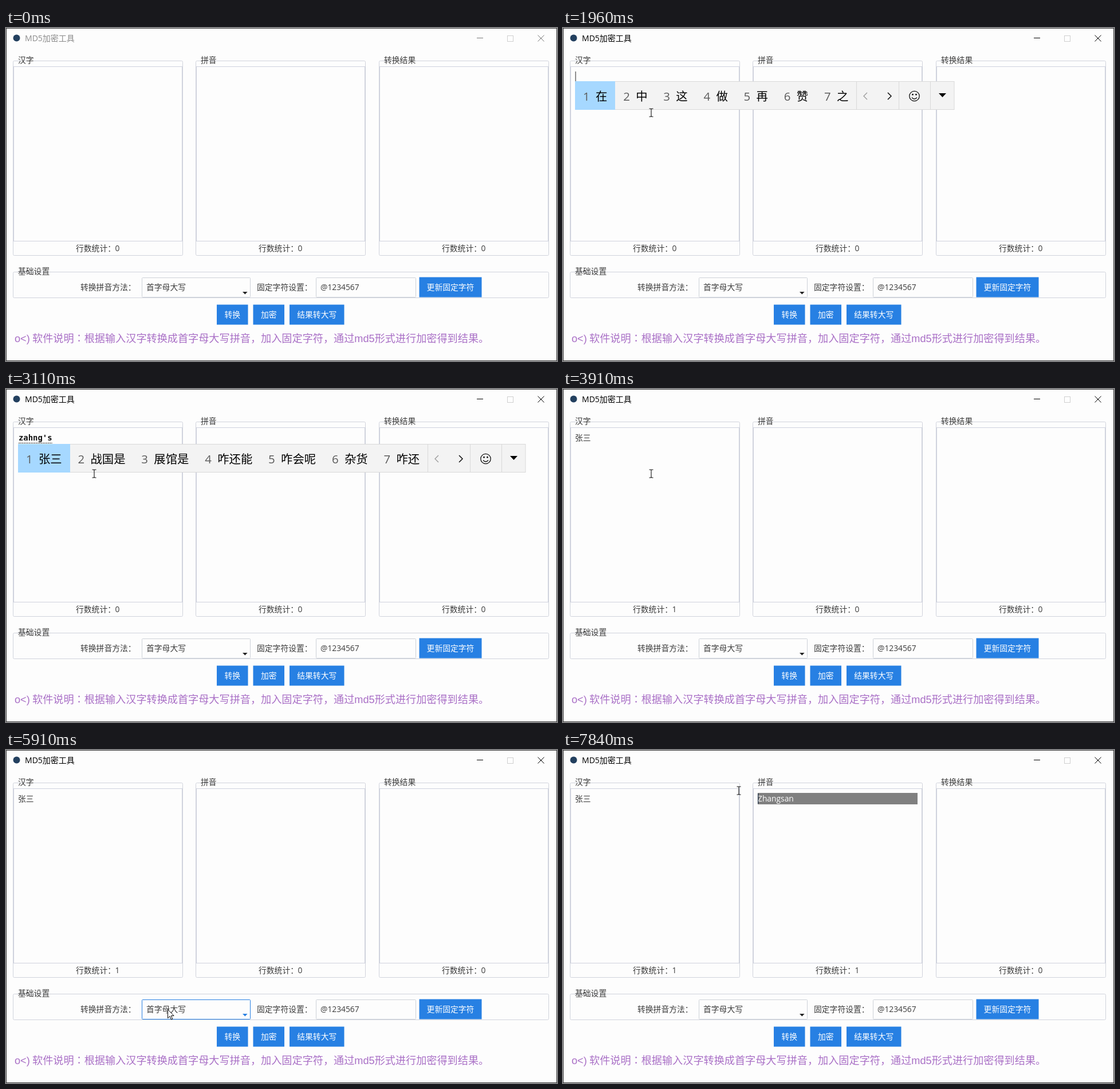
Recreate the animation shown at these times as an HTML page. Size 962x582 px, loop 7.99 s.

```html
<!DOCTYPE html>
<html lang="zh-CN">
<head>
<meta charset="utf-8">
<title>MD5加密工具</title>
<style>
html, body { margin: 0; width: 100%; height: 100%; overflow: hidden; background: #fdfdfd; }
svg { display: block; width: 962px; height: 582px; }
text { font-family: "Open Sans", "Noto Sans CJK SC", sans-serif; font-size: 13.8px; fill: #3b3b3b; white-space: pre; }
#title { font-size: 14px; }
.note { font-family: "Liberation Sans", "Noto Sans CJK SC", sans-serif; font-size: 18.15px; font-weight: 300; fill: #a96fc6; }
.note.mid { font-family: "Noto Sans CJK TC", sans-serif; }
.btn { fill: #fff; }
.cand { font-size: 20.35px; fill: #000; }
.num { font-size: 20.35px; fill: #5c5c5c; }
.comp { font: bold 13.9px "DejaVu Sans Mono", monospace; fill: #111; }
</style>
</head>
<body>
<svg id="stage" viewBox="0 0 962 582"></svg>
<script>
const LOOP = 7990;
const BLUE = '#2780e3', DARK = '#2171cb', LINE = '#d0d3dc';

const text = (x, y, s, attrs = '') => `<text x="${x}" y="${y}" ${attrs}>${s}</text>`;
const rect = (x, y, w, h, fill, attrs = '') =>
  `<rect x="${x}" y="${y}" width="${w}" height="${h}" fill="${fill}" ${attrs}/>`;
const box = (x, y, w, h, stroke = LINE, attrs = '') =>
  rect(x + .5, y + .5, w - 1, h - 1, 'none', `stroke="${stroke}" ${attrs}`);
const path = (d, stroke, attrs = '') => `<path d="${d}" fill="none" stroke="${stroke}" ${attrs}/>`;

const frame = (x, y, w, h, label) => box(x, y, w, h, LINE, 'rx="2"') + text(x + 9, y + 4, label);

const panel = (x, label, id) =>
  frame(x, 57, 297, 341, label) +
  rect(x + 1.5, 67.5, 294, 305, '#fdfdfd', 'stroke="#cfd2de"') +
  text(x + 110, 390, '行数统计：') + text(x + 178.5, 390, '0', `id="${id}"`);

const button = (x, y, w, h, label, id) =>
  rect(x, y, w, h, BLUE, `id="${id}"`) + text(x + w / 2, y + h / 2 + 5, label, 'class="btn" text-anchor="middle"');

const stage = document.getElementById('stage');
stage.innerHTML =
  '<defs><clipPath id="clip"><rect id="clipBox" y="70" width="300" height="30"/></clipPath></defs>' +
  rect(0, 0, 962, 582, '#fdfdfd') + box(0, 0, 962, 582, '#3a3a3a') +
  '<circle cx="18.5" cy="17.5" r="6" fill="#23405f"/>' +
  text(33, 22.5, 'MD5加密工具', 'id="title"') +
  path('M822 17.5h11M928.5 12.5l11 11M939.5 12.5l-11 11', '#000', 'id="controls"') +
  box(875, 13, 11, 11, '#cfcfcf') +
  panel(12, '汉字', 'count1') + panel(331, '拼音', 'count2') + panel(651, '转换结果', 'count3') +
  frame(12, 426, 936, 46, '基础设置') +
  text(130, 458, '转换拼音方法：') +
  rect(237.5, 436.5, 189, 34, '#fdfdfd', 'id="combo" rx="1"') +
  rect(245, 443, 70, 20, '#808080', 'id="comboSel"') +
  text(245, 458, '首字母大写', 'id="comboText"') +
  '<path id="drop" d="M413 461h8.6l-4.3 4.6z"/>' +
  text(438, 458, '固定字符设置：') +
  box(541, 436, 175, 35, '#cdd1d8', 'rx="1"') + text(549, 458, '@1234567') +
  button(721.5, 435.5, 109, 35, '更新固定字符', 'update') +
  button(368, 483.5, 54.5, 35, '转换', 'convert') +
  button(431.5, 483.5, 54.5, 35, '加密', 'encrypt') +
  button(495, 483.5, 95.5, 35, '结果转大写', 'upper') +
  text(15, 549, 'o&lt;)', 'class="note"') + text(46, 549, '软件说明', 'class="note"') +
  text(118.6, 549, '：', 'class="note mid"') +
  text(136.7, 549, '根据输入汉字转换成首字母大写拼音，加入固定字符，通过md5形式进行加密得到结果。', 'class="note"') +
  text(21, 90, '张三', 'id="name"') +
  text(340, 90, 'Zhangsan', 'id="pinyin"') +
  '<g id="pick" clip-path="url(#clip)">' + rect(340, 75, 279, 20, '#808080') +
  text(340, 90, 'Zhangsan', 'class="btn"') + '</g>' +
  rect(340, 76, 1.2, 18, '#1d2f45', 'id="pickCaret"') +
  rect(21.5, 76, 1, 17, '#222', 'id="caret"') +
  '<g id="ime"></g>' +
  '<g id="ibeam">' +
  path('M-3.5-7h2.5l1 1 1-1h2.5M0-6v12M-3.5 7h2.5l1-1 1 1h2.5', '#111', 'stroke-width="1.1"') + '</g>' +
  '<path id="arrow" d="M.5.5v15.2l3.5-3.4 2.5 5.8 2.3-1-2.5-5.6h4.8z" fill="#fff" stroke="#000"/>';

const el = {};
stage.querySelectorAll('[id]').forEach(n => el[n.id] = n);
const show = (n, on) => n.style.display = on ? '' : 'none';

// Input method: start time, typed letters, candidates
const Z = '在 中 这 做 再 赞 之';
const typing = [
  [1960, '', Z],
  [2010, 'z', Z],
  [2140, 'za', '在 咋 杂 砸 扎 咱 匝'],
  [2330, 'zah', '咋会 咋还 杂货 砸坏 杂 砸 扎'],
  [2500, 'zahn', '咋还能 咋会呢 杂货 咋还 咋会 杂 砸'],
  [2730, 'zahng', '张 战国 展馆 咋还能 咋会呢 杂货 咋还'],
  [3020, "zahng's", '张三 战国是 展馆是 咋还能 咋会呢 杂货 咋还'],
  [3220, '', '']
];

function imeMarkup(letters, list) {
  if (!list) return '';
  const y = letters ? 96 : 93, mid = y + 26;
  let x = 21, cells = '', first = 0;
  list.split(' ').forEach((word, i) => {
    const w = 49.8 + 20.35 * word.length;
    if (!i) first = w;
    cells += text(x + 14, mid + 7.5, i + 1, 'class="num"') + text(x + 36, mid + 7.5, word, 'class="cand"');
    x += w;
  });
  const e = Math.round(x), sep = dx => `M${e + dx + .5} ${y}v50`;
  return text(22, 90, letters, 'class="comp"') +
    (letters ? path(`M22 94.5h${letters.length * 8.37}`, '#222', 'stroke-dasharray="2 1"') : '') +
    rect(21.5, y + .5, e + 149.5, 49, '#f3f3f3', 'stroke="#d9d9d9"') +
    rect(21, y, Math.round(first), 50, '#a6d8ff') + cells +
    path(sep(0) + sep(74) + sep(129), '#d9d9d9') +
    path(`M${e + 19} ${mid - 6}l-6 6 6 6`, '#999', 'stroke-width="1.3"') +
    path(`M${e + 55} ${mid - 6}l6 6-6 6`, '#111', 'stroke-width="1.5"') +
    `<circle cx="${e + 101.5}" cy="${mid}" r="8.7" fill="none" stroke="#111" stroke-width="1.3"/>` +
    path(`M${e + 97} ${mid + 2.5}q4.5 5 9 0`, '#111', 'stroke-width="1.3"') +
    `<path d="M${e + 97.3} ${mid - 4}h2.4v2.4h-2.4zM${e + 103.3} ${mid - 4}h2.4v2.4h-2.4zM${e + 144} ${mid - 5}h13l-6.5 7z"/>`;
}

// Pointer: time, x, y
const track = [
  [480, 300, 570], [580, 262, 470], [680, 190, 260], [770, 154, 148],
  [3990, 154, 148], [4160, 340, 152], [4330, 478, 84],
  [4470, 478, 84], [4750, 400, 290], [4980, 318, 466], [5080, 307, 461], [5120, 307, 461],
  [5170, 306, 460], [5330, 306, 460], [5600, 241, 452], [5850, 290, 456], [6100, 258, 445],
  [6150, 258, 445], [6380, 346, 457], [6530, 346, 457], [6610, 365, 488], [6660, 365, 488],
  [6800, 385, 501], [7290, 385, 502], [7420, 405, 310], [7560, 440, 112],
  [7690, 370, 84], [7800, 307, 71], [7990, 307, 71]
];

function pointer(t) {
  const i = track.findIndex(p => p[0] > t);
  if (i < 1) return [-99, -99];
  const [t0, x0, y0] = track[i - 1], [t1, x1, y1] = track[i], k = (t - t0) / (t1 - t0);
  return [Math.round(x0 + (x1 - x0) * k), Math.round(y0 + (y1 - y0) * k)];
}

const inside = (x, y, l, top, r, b) => x >= l && x <= r && y >= top && y <= b;
let imeStep;

function draw(t) {
  const active = t >= 1460;
  el.title.style.fill = active ? '#000' : '#8c8c8c';
  el.controls.setAttribute('stroke', active ? '#000' : '#777');

  const step = typing.filter(s => s[0] <= t).pop();
  if (step !== imeStep) {
    imeStep = step;
    el.ime.innerHTML = step ? imeMarkup(step[1], step[2]) : '';
  }
  show(el.name, t >= 3220);
  show(el.caret, t >= 1520 && t < 2010 || t >= 3290 && t < 3910);
  el.caret.setAttribute('x', t < 3000 ? 21.5 : 49);

  const done = t >= 6950;
  show(el.pinyin, done);
  el.count1.textContent = t >= 3410 ? 1 : 0;
  el.count2.textContent = done ? 1 : 0;

  const [x, y] = pointer(t);
  const beam = [13, 332, 652].some(l => inside(x, y, l, 67, l + 295, 373));
  show(el.ibeam, beam);
  show(el.arrow, !beam && t >= 480);
  (beam ? el.ibeam : el.arrow).setAttribute('transform', `translate(${x} ${y})`);

  const focus = t >= 6530 && t < 6950, lit = focus || inside(x, y, 237, 436, 427, 471);
  const marked = t >= 6530 && t < 7560;
  el.combo.setAttribute('stroke', lit ? BLUE : '#cdd1d8');
  el.combo.setAttribute('stroke-width', focus ? 2 : 1);
  el.drop.setAttribute('fill', lit ? BLUE : '#222');
  show(el.comboSel, marked);
  el.comboText.style.fill = marked ? '#fff' : '';
  el.convert.setAttribute('fill', inside(x, y, 368, 483, 423, 519) ? DARK : BLUE);

  const picking = t >= 7560 && y < 96, from = Math.min(404, Math.max(340, x));
  show(el.pick, picking);
  show(el.pickCaret, picking);
  el.clipBox.setAttribute('x', from);
  el.pickCaret.setAttribute('x', from);
}

const start = performance.now();
function tick() {
  draw((performance.now() - start) % LOOP);
  requestAnimationFrame(tick);
}
tick();
</script>
</body>
</html>
```
